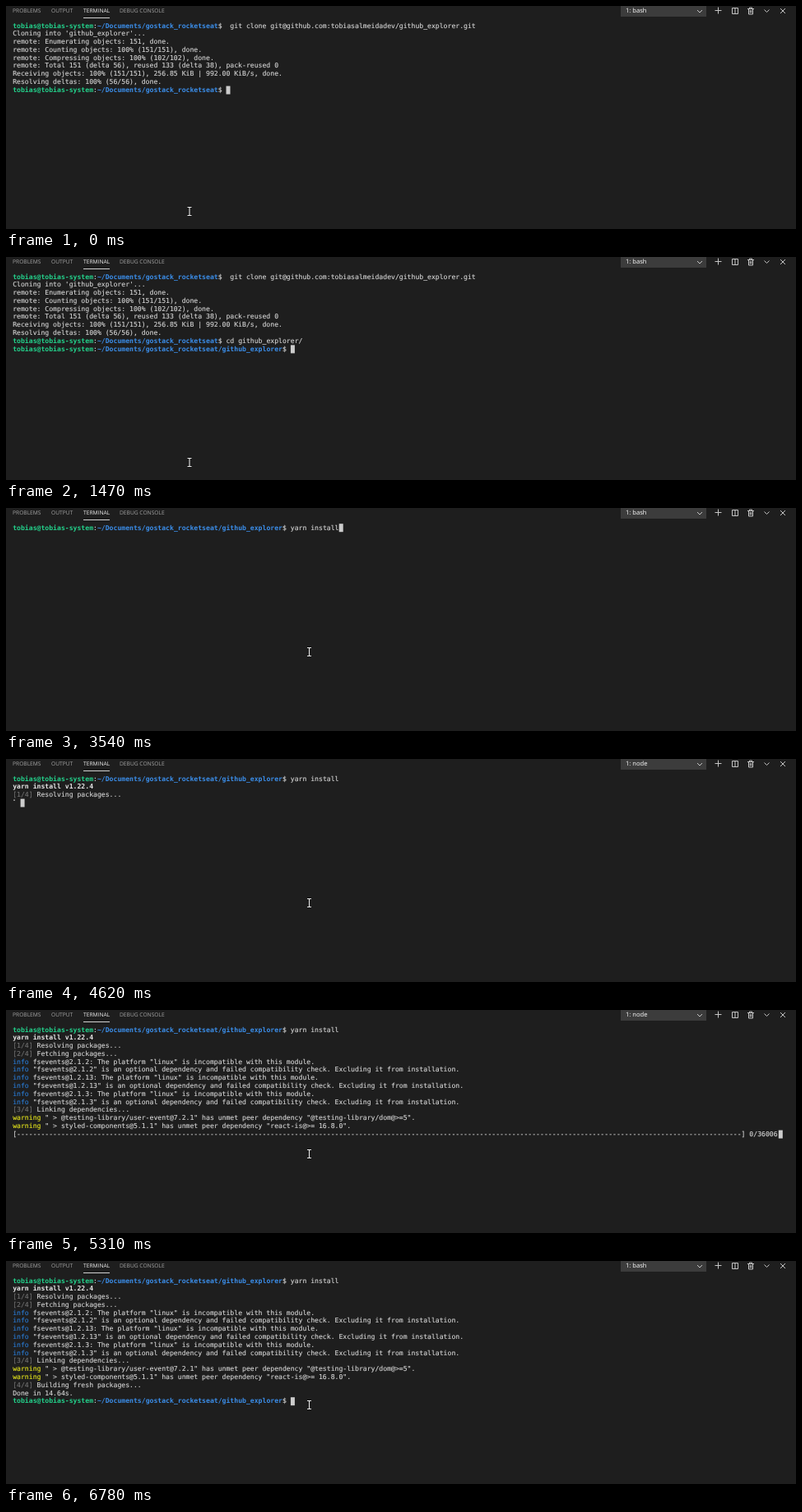
Write an HTML page that moves like this. It is 960x272 px and loops after 7.11 s.

```html
<!DOCTYPE html>
<html lang="en">
<head>
<meta charset="utf-8">
<title>Terminal session</title>
<style>
  html, body { margin: 0; width: 100%; height: 100%; overflow: hidden; background: #1e1e1e; }
  #stage { position: relative; width: 960px; height: 272px; overflow: hidden; background: #1e1e1e;
    text-rendering: geometricPrecision; }
  #stage > * { position: absolute; }
  .tab { top: 0; font: 6.68px/12px "Open Sans", "Noto Sans", sans-serif; color: #a4a4a4; white-space: pre; }
  .tab.on { color: #f0f0f0; }
  #line { left: 94px; top: 14px; width: 32px; height: 1px; background: #d0d0d0; }
  #pick { left: 747px; top: 0; width: 104px; height: 13px; background: #3c3c3c; }
  #title { left: 753px; top: 0; font: 7.6px/12px "Open Sans", "Noto Sans", sans-serif; color: #fff; white-space: pre; }
  #icons { left: 0; top: 0; fill: none; stroke: #c5c5c5; stroke-width: 1; }
  #screen { left: 8.2px; top: 19.5px; color: #d6d6d6; white-space: pre;
    font: 8.15px/9.8px "DejaVu Sans Mono", "Liberation Mono", monospace;
    -webkit-text-stroke: .12px currentColor; }
  #screen div { height: 9.8px; }
  #screen b { font-weight: bold; -webkit-text-stroke-width: 0; }
  .user { color: #23d18b; }
  .path { color: #3b8eea; }
  .head { color: #e5e5e5; }
  .dim { color: #707070; }
  .info { color: #2a7ad2; }
  .warn { color: #e9e91c; }
  #cursor { left: 0; top: 0; width: 4.9px; height: 9.8px; background: #ccc; }
  #mouse { left: 0; top: 0; }
</style>
</head>
<body>
<div id="stage">
  <div class="tab" style="left:8px">PROBLEMS</div>
  <div class="tab" style="left:55px">OUTPUT</div>
  <div class="tab on" style="left:94px">TERMINAL</div>
  <div class="tab" style="left:138px">DEBUG CONSOLE</div>
  <div id="line"></div>
  <div id="pick"></div>
  <div id="title">1: bash</div>
  <svg id="icons" width="960" height="16">
    <path d="M840 5l3 3 3-3M861.5 5.5h8M865.5 1.5v8M921.5 4.5l3 3 3-3M941 3l6 6M947 3l-6 6"/>
    <path d="M882.5 2.5h7v7h-7zM886 2.5v7"/>
    <path d="M901 3.5h8M903.5 3.5v-1.5h3v1.5M902.5 3.5v6.5h5v-6.5M904.2 5v3.5M905.8 5v3.5"/>
  </svg>
  <div id="screen"></div>
  <div id="cursor"></div>
  <svg id="mouse" width="9" height="13" viewBox="-4.5 -6.5 9 13" fill="none">
    <path d="M-2.5-5h5M0-5v10M-2.5 5h5" stroke="#111" stroke-width="2.4"/>
    <path d="M-2.5-5h5M0-5v10M-2.5 5h5" stroke="#eee" stroke-width="1.1"/>
  </svg>
</div>
<script>
const LOOP = 7110, TICK = 30, CELL = 4.9, ROW = 9.8, COLS = 190;
const $ = id => document.getElementById(id);
const paint = (cls, text, tag = 'span') => `<${tag} class="${cls}">${text}</${tag}>`;

const HOME = '~/Documents/gostack_rocketseat';
const REPO = HOME + '/github_explorer';
const prompt = path => paint('user', 'tobias@tobias-system', 'b') + ':' + paint('path', path, 'b') + '$ ';
const HOME_COL = 53, REPO_COL = 69;

const clone = [
  prompt(HOME) + ' git clone git@github.com:tobiasalmeidadev/github_explorer.git',
  "Cloning into 'github_explorer'...",
  'remote: Enumerating objects: 151, done.',
  'remote: Counting objects: 100% (151/151), done.',
  'remote: Compressing objects: 100% (102/102), done.',
  'remote: Total 151 (delta 56), reused 133 (delta 38), pack-reused 0',
  'Receiving objects: 100% (151/151), 256.85 KiB | 992.00 KiB/s, done.',
  'Resolving deltas: 100% (56/56), done.'
];

const step = (n, text) => paint('dim', `[${n}/4]`) + ` ${text}...`;
const warning = text => paint('warn', 'warning') + ' ' + text;
const skipped = ['2.1.2', '1.2.13', '2.1.3'].flatMap(v => [
  `fsevents@${v}: The platform "linux" is incompatible with this module.`,
  `"fsevents@${v}" is an optional dependency and failed compatibility check. Excluding it from installation.`
]).map(text => paint('info', 'info') + ' ' + text);

// Lines of the install log with the time each one appears.
const log = [
  [4260, prompt(REPO) + 'yarn install'],
  [4320, paint('head', 'yarn install v1.22.4', 'b')],
  [4380, step(1, 'Resolving packages')],
  [4650, step(2, 'Fetching packages')],
  ...skipped.map((text, i) => [4830 + 30 * (i >> 1), text]),
  [4920, step(3, 'Linking dependencies')],
  [4950, warning('" > @testing-library/user-event@7.2.1" has unmet peer dependency "@testing-library/dom@>=5".')],
  [4980, warning('" > styled-components@5.1.1" has unmet peer dependency "react-is@>= 16.8.0".')],
  [6480, step(4, 'Building fresh packages')],
  [6660, 'Done in 14.64s.']
];

// Key presses: time and the text typed so far.
const cdKeys = [[30, 'c'], [90, 'cd'], [240, 'cd '], [420, 'cd g'], [450, 'cd gi'], [510, 'cd git'],
  [690, 'cd gith'], [930, 'cd githu'], [990, 'cd github'], [1110, 'cd github_explorer/']];
const yarnKeys = [[2250, 'y'], [2340, 'ya'], [2400, 'yar'], [2490, 'yarn'], [2790, 'yarn '],
  [3030, 'yarn i'], [3090, 'yarn in'], [3120, 'yarn ins'], [3180, 'yarn inst'], [3240, 'yarn insta'],
  [3450, 'yarn instal'], [3540, 'yarn install']];
const typed = (keys, t) => keys.reduce((text, [at, next]) => t >= at ? next : text, '');

function bar(done, total) {
  const tail = ` ${done}/${total}`;
  const width = COLS - tail.length - 2;
  const full = Math.round(width * done / total);
  return `[${'#'.repeat(full)}${'-'.repeat(width - full)}]${tail}`;
}

const spinner = t => '⠁⠂⠄⡀⢀⠠⠐⠈'[Math.floor((t - 4380) / TICK) % 8] + ' ';
const clamp = x => Math.min(1, Math.max(0, x));

function view(t) {
  if (t < 1470) {
    const text = typed(cdKeys, t);
    return { lines: [...clone, prompt(HOME) + text], col: HOME_COL + text.length };
  }
  if (t < 1980) {
    return { lines: [...clone, prompt(HOME) + 'cd github_explorer/', prompt(REPO)], col: REPO_COL };
  }
  if (t < 4260) {
    const text = typed(yarnKeys, t);
    return { lines: [prompt(REPO) + text], col: REPO_COL + text.length };
  }
  const lines = log.filter(([at]) => t >= at).map(([, text]) => text);
  const add = (text, col) => ({ lines: [...lines, text], col });
  if (t >= 4380 && t < 4650 || t >= 6480 && t < 6660) return add(spinner(t), 2);
  if (t >= 4650 && t < 4830) return add(bar(Math.round(1642 * (t - 4650) / 150 * .85), 1642), COLS);
  if (t >= 5010 && t < 6480) {
    return add(bar(Math.round(36006 * clamp((t - 5910) / 570) ** 4.1577), 36006), COLS);
  }
  if (t >= 6660) return add(prompt(REPO), REPO_COL);
  return add('', 0);
}

let shown = -1;
function draw(now) {
  const t = Math.floor(now % LOOP / TICK) * TICK;
  if (t !== shown) {
    shown = t;
    const { lines, col } = view(t);
    $('screen').innerHTML = lines.map(text => `<div>${text}</div>`).join('');
    $('cursor').style.transform = `translate(${7.8 + col * CELL}px, ${19.2 + (lines.length - 1) * ROW}px)`;
    $('title').textContent = t >= 4410 && t < 6750 ? '1: node' : '1: bash';
    const p = clamp((t - 1980) / 270), k = p * p * (3 - 2 * p);
    $('mouse').style.transform = `translate(${218.5 + 145.5 * k}px, ${244 - 75 * k}px)`;
  }
}

const start = performance.now();
function loop() {
  draw(performance.now() - start);
  requestAnimationFrame(loop);
}
loop();
</script>
</body>
</html>
```
